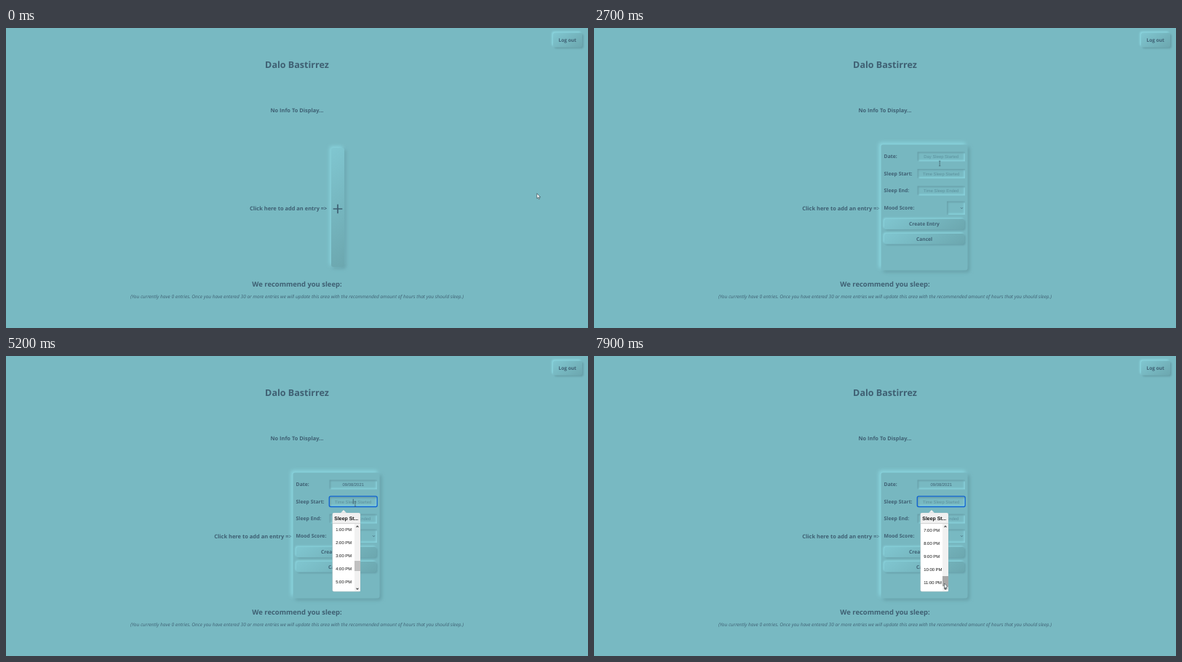
These frames come from a looping animation (800x413 px, 8 s). An HTML page:

```html
<!DOCTYPE html>
<html lang="en">
<head>
<meta charset="utf-8">
<title>Sleep journal</title>
<style>
  html, body { margin: 0; width: 100%; height: 100%; overflow: hidden; background: #78b9c2; }
  svg { display: block; }
  #stage { width: 100vw; height: 100vh; }
  text { font-family: "Open Sans", "Noto Sans", sans-serif; fill: #3f6073; text-rendering: geometricPrecision; }
  .bold { font-weight: 700; }
  .note { font-style: italic; }
  .field, .pop { font-family: "Liberation Sans", Arial, sans-serif; }
  .pop { fill: #111; }
  .hint { fill: #5c919d; }
</style>
</head>
<body>
<svg id="stage" viewBox="0 0 800 413">
  <defs>
    <filter id="soft" x="-100%" y="-100%" width="300%" height="300%"><feGaussianBlur stdDeviation="2.4"/></filter>
    <filter id="fine" x="-100%" y="-100%" width="300%" height="300%"><feGaussianBlur stdDeviation="1.3"/></filter>
  </defs>
</svg>
<script>
const LOOP = 8000, STEP = 100;
const BG = '#78b9c2', LIGHT = '#8ad5df', DARK = '#669ea7', INK = '#3f6073';
const stage = document.getElementById('stage');
const defs = stage.querySelector('defs');

function el(parent, tag, attrs = {}) {
  const node = document.createElementNS('http://www.w3.org/2000/svg', tag);
  for (const key in attrs) node.setAttribute(key, attrs[key]);
  parent.appendChild(node);
  return node;
}
const group = (parent = stage) => el(parent, 'g');
const rect = (parent, x, y, width, height, rx, fill, more) =>
  el(parent, 'rect', { x, y, width, height, rx, fill, ...more });
const line = (parent, d, stroke, width) =>
  el(parent, 'path', { d, fill: 'none', stroke, 'stroke-width': width });
const show = (node, on) => node.setAttribute('display', on ? 'inline' : 'none');

// y is the middle of the capital letters
function label(parent, x, y, str, size, cls = 'bold', anchor = 'middle') {
  const node = el(parent, 'text', { x, y: y + size * 0.36, 'font-size': size, class: cls, 'text-anchor': anchor });
  node.textContent = str;
  return node;
}

// 145 degree gradient over a box, as CSS would lay it out
function slope(x, y, w, h) {
  const dx = 0.574, dy = 0.819, half = (w * dx + h * dy) / 2;
  const cx = x + w / 2, cy = y + h / 2;
  const id = 'g' + defs.children.length;
  const grad = el(defs, 'linearGradient', {
    id, gradientUnits: 'userSpaceOnUse',
    x1: cx - dx * half, y1: cy - dy * half, x2: cx + dx * half, y2: cy + dy * half
  });
  el(grad, 'stop', { offset: 0, 'stop-color': '#80c6d0' });
  el(grad, 'stop', { offset: 1, 'stop-color': '#6ca7af' });
  return `url(#${id})`;
}

function raised(parent, x, y, w, h, fill, shift, blur) {
  const filter = `url(#${blur})`;
  rect(parent, x + shift, y + shift, w, h, 3, DARK, { filter });
  rect(parent, x - shift, y - shift, w, h, 3, LIGHT, { filter });
  return rect(parent, x, y, w, h, 3, fill || slope(x, y, w, h));
}

function sunken(parent, x, y, w, h) {
  const box = el(parent, 'svg', { x, y, width: w, height: h });
  rect(box, 0, 0, w, h, 0, BG);
  const rim = (d, fill) => el(box, 'path', {
    d: `M-9-9H${w + 9}V${h + 9}H-9ZM${d} ${d}V${h + d}H${w + d}V${d}Z`,
    fill, 'fill-rule': 'evenodd', filter: 'url(#fine)'
  });
  rim(-1.4, LIGHT);
  rim(1.4, DARK);
}

// Page
rect(stage, 0, 0, 800, 413, 0, BG);
raised(stage, 752, 6.5, 40, 20, null, 1.8, 'fine');
label(stage, 771.7, 16.5, 'Log out', 6.6);
label(stage, 400, 50.7, 'Dalo Bastirrez', 12.55);
label(stage, 400, 113.3, 'No Info To Display...', 7.45);
const prompt = label(stage, 335, 248, 'Click here to add an entry =>', 7.48, 'bold', 'start');
label(stage, 400, 352.3, 'We recommend you sleep:', 9.45);
label(stage, 400, 370, '(You currently have 0 entries. Once you have entered 30 or more entries we will update this area ' +
  'with the recommended amount of hours that you should sleep.)', 6.53, 'note');

// Add button
const add = group();
raised(add, 447, 165, 18, 164, null, 2, 'soft');
const addFlat = rect(add, 447, 165, 18, 164, 3, BG);
line(add, 'M449.7 249H462.3M456 242.7V255.3', INK, 1.7);

// Entry form
const form = group();
raised(form, 394.5, 160.5, 119, 173, '#77b7c0', 2.7, 'soft');
const ROWS = [
  ['Date:', 177, 'Day Sleep Started'],
  ['Sleep Start:', 200.5, 'Time Sleep Started'],
  ['Sleep End:', 224, 'Time Sleep Ended']
];
const hints = ROWS.map(([name, y, hint]) => {
  label(form, 398.6, y, name, 6.85, 'bold', 'start');
  sunken(form, 444.5, y - 6.5, 65.5, 13);
  return label(form, 477.2, y, hint, 5.9, 'field hint');
});
const dateText = label(form, 477.2, 177, '09/08/2021', 5.9, 'field');
label(form, 398.6, 248, 'Mood Score:', 6.9, 'bold', 'start');
sunken(form, 485, 238.5, 25, 18.5);
line(form, 'M504 247.2L505.5 248.7L507 247.2', INK, 0.8);
[['Create Entry', 270], ['Cancel', 290.3]].forEach(([name, y]) => {
  raised(form, 399, y - 7.2, 110, 14.4, null, 1.4, 'fine');
  label(form, 454, y, name, 6.72);
});

// Focus ring and text caret, placed on the active field
const focus = group();
rect(focus, 444.3, -7.2, 65.9, 14.4, 2, 'none', { stroke: '#0f62d2', 'stroke-width': 1.3 });
const caret = line(focus, 'M477.3-3.4V3.4', '#2b4655', 0.7);

// Calendar
const FRAME = { stroke: '#9fb4b8', 'stroke-width': 0.5 };
const cal = group();
el(cal, 'path', { d: 'M467.3 190.3L471.5 186L475.7 190.3Z', fill: '#f0f0f0' });
rect(cal, 448.7, 190, 107.1, 104.5, 2, '#fff', FRAME);
rect(cal, 449, 190.3, 106.5, 26, 1.8, '#f0f0f0');
line(cal, 'M449 216.4H555.6', '#aeaeae', 0.5);
el(cal, 'path', { d: 'M460 195.3V199.7L457 197.5Z', fill: '#c6c6c6' });
el(cal, 'path', { d: 'M545.2 195.3V199.7L548.2 197.5Z', fill: '#c6c6c6' });
label(cal, 502.3, 197.7, 'September 2021', 6.7, 'pop bold');
const colX = c => 459 + c * 14.5, rowY = r => 226.7 + r * 14.5;
['Su', 'Mo', 'Tu', 'We', 'Th', 'Fr', 'Sa'].forEach((d, c) => label(cal, colX(c), 209, d, 5.75, 'pop'));
const hoverDay = rect(cal, 0, 0, 12.1, 12.1, 2, '#ececec');
rect(cal, colX(3) - 6.2, rowY(1) - 6.1, 12.2, 12.2, 2, '#2277bf');
for (let i = 0; i < 35; i++) {
  const day = i < 3 ? 29 + i : i < 33 ? i - 2 : i - 32;
  const node = label(cal, colX(i % 7), rowY(Math.floor(i / 7)), day, 5.75, 'pop');
  if (i === 10) node.style.fill = '#fff';
}

// Time list
const ROW = 17.87, MAX_THUMB = 21, MAX_SCROLL = 6 * ROW - 0.8;
const list = group();
el(list, 'path', { d: 'M459.8 216.3L464 212L468.2 216.3Z', fill: '#f0f0f0' });
rect(list, 448.7, 216, 38.3, 108.3, 2, '#fff', FRAME);
rect(list, 449, 216.3, 37.7, 14.2, 1.8, '#f0f0f0');
line(list, 'M449 230.6H486.8', '#aeaeae', 0.5);
label(list, 467.8, 223.3, 'Sleep St...', 6.9, 'pop bold');
const view = el(list, 'svg', { x: 449, y: 231, width: 38, height: 93 });
const times = group(view);
for (let h = 0; h < 24; h++)
  label(times, 4.2, 8.2 + (h - 13) * ROW, `${h % 12 || 12}:00 ${h < 12 ? 'AM' : 'PM'}`, 5.9, 'pop', 'start');
rect(view, 30, 0, 8, 93, 0, '#f1f1f1');
line(view, 'M32.5 4.6L34 3.1L35.5 4.6M32.5 88.6L34 90.1L35.5 88.6', '#404040', 1.1);
const thumb = rect(view, 30, 51, 8, 14, 0, '#c1c1c1');

// Pointer shapes, each drawn from its hot spot
const pointer = group();
const OUTLINE = { fill: '#fff', stroke: '#26363d', 'stroke-width': 0.6, 'stroke-linejoin': 'round' };
const shapes = {
  arrow: el(pointer, 'path', { d: 'M0 0V6.8L1.5 5.4L2.6 7.9L3.7 7.4L2.6 5H4.8Z', ...OUTLINE }),
  hand: el(pointer, 'path', {
    d: 'M-.8.7A.8.8 0 0 1 .8.7V3.3L3.7 4Q4.7 4.4 4.5 5.4L3.9 9H-.2L-2.8 5.6Q-3.1 4.5-2 4.7L-.8 5.6Z', ...OUTLINE
  }),
  beam: line(pointer, 'M-1.2-3.3H1.2M0-3.3V3.3M-1.2 3.3H1.2', '#3f5963', 0.65)
};

// time, x, y
const PATH = [
  [0, 729.8, 227.8], [900, 449.5, 249], [1100, 460.4, 254], [2100, 460.4, 254], [2700, 475.2, 186.5],
  [3600, 475.2, 186.5], [4100, 500.7, 237], [4300, 519, 239], [4500, 502, 238], [5000, 480, 203.5],
  [5400, 480, 203.5], [6400, 481, 286], [6500, 481, 286], [7200, 481.5, 311], [7400, 481.6, 313], [8000, 481.6, 313]
];
const ease = u => u * u * (3 - 2 * u);

function place(t) {
  const i = PATH.findIndex((p, n) => n && t <= p[0]);
  const [t0, x0, y0] = PATH[i - 1], [t1, x1, y1] = PATH[i];
  const u = ease((t - t0) / (t1 - t0));
  return [x0 + (x1 - x0) * u, y0 + (y1 - y0) * u];
}

function shapeAt(t, x, y) {
  if (t < 1400) return x < 466 ? 'hand' : 'arrow';
  if (t >= 3200 && t < 4600) return y < 190 ? 'beam' : y > 219 ? 'hand' : 'arrow';
  const inField = ROWS.some(r => Math.abs(y - r[1]) < 7) || (t < 3200 && y < 188);
  const covered = t >= 5100 && y > 212;
  return inField && !covered ? 'beam' : 'arrow';
}

function draw(t) {
  const [x, y] = place(t);
  const opened = t >= 1400, picked = t >= 4600;
  const onDate = t >= 3200 && t < 4500, onStart = t >= 5100;

  prompt.setAttribute('x', opened ? 286.3 : 335);
  show(add, !opened);
  show(addFlat, x < 466);
  show(form, opened);
  const s = 0.934 + 0.066 * ease(Math.min(1, Math.max(0, (t - 1400) / 200)));
  form.setAttribute('transform', `translate(454 247.2) scale(${s}) translate(-454 -247.2)`);
  show(hints[0], !picked);
  show(dateText, picked);

  show(focus, onDate || onStart);
  focus.setAttribute('transform', `translate(0 ${onStart ? 200.3 : 176.7})`);
  show(caret, (t - (onStart ? 5100 : 3200)) % 1060 < 530);

  show(cal, t >= 3200 && !picked);
  const col = Math.round((x - 459) / 14.5), row = Math.round((y - 226.7) / 14.5);
  show(hoverDay, row >= 0);
  hoverDay.setAttribute('x', colX(col) - 6);
  hoverDay.setAttribute('y', rowY(row) - 6);

  show(list, onStart);
  const drag = t >= 6500 ? Math.min(MAX_THUMB, y - 286) : 0;
  thumb.setAttribute('y', 51 + drag);
  thumb.setAttribute('fill', t >= 7800 ? '#a8a8a8' : t >= 6500 ? '#7b7b7b' : y > 282 ? '#a8a8a8' : '#c1c1c1');
  times.setAttribute('transform', `translate(0 ${-MAX_SCROLL * drag / MAX_THUMB})`);

  pointer.setAttribute('transform', `translate(${x} ${y})`);
  const shape = shapeAt(t, x, y);
  for (const name in shapes) show(shapes[name], name === shape);
}

const start = performance.now();
function tick() {
  const t = (performance.now() - start) % LOOP;
  draw(Math.floor(t / STEP) * STEP);
  requestAnimationFrame(tick);
}
tick();
</script>
</body>
</html>
```
